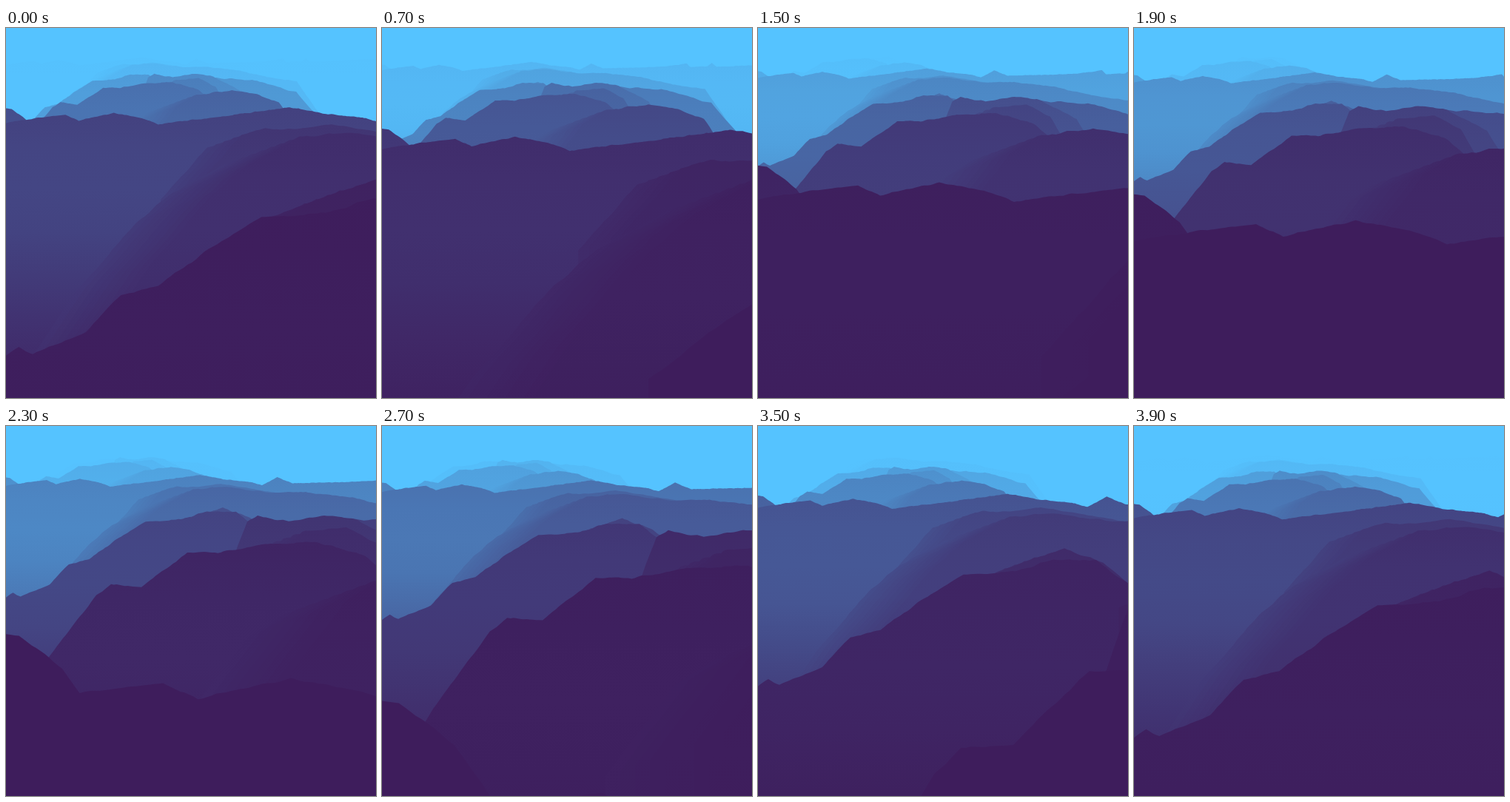
An HTML page with a canvas that plays this animation: 500x500 px, repeating every 4 s.

```html
<!DOCTYPE html>
<html>
<head>
<meta charset="utf-8">
<title>Flight over misty ridges</title>
<style>
html, body { margin: 0; width: 100%; height: 100%; overflow: hidden; background: #55c3ff; }
canvas { display: block; width: 100vw; height: 100vh; }
</style>
</head>
<body>
<canvas id="stage" width="500" height="500"></canvas>
<script>
const ctx = document.getElementById('stage').getContext('2d');
const LOOP = 4;              // seconds per cycle; the eye moves one unit per second
const HORIZON = -23;         // y of the vanishing point, whose x is 0
const NEAR = 0.45, FAR = 8.2;
const SKY = [85, 195, 255], DARK = [62, 29, 92];

const clamp = v => Math.min(1, Math.max(0, v));
const mix = (a, b, k) => a + (b - a) * k;

// Colour of the ground seen through the haze at distance d
function haze(d) {
  const u = clamp((d - 1.85) / 6.25);
  const k = u * u * (3 - 2 * u);
  return `rgb(${DARK.map((c, i) => Math.round(mix(c, SKY[i], k)))})`;
}

// Change of distance down a slope, u from crest to foot
const slope = u => 0.18 * Math.sin(Math.PI * clamp(u / 0.45)) - 1.3 * clamp((u - 0.43) / 0.57);

// Seeded value noise in -1..1, two octaves
function hash(n) {
  const v = Math.sin(n * 127.1) * 43758.5453;
  return 2 * (v - Math.floor(v)) - 1;
}
function noise(x) {
  const i = Math.floor(x);
  return mix(hash(i), hash(i + 1), x - i);
}
const rough = x => 1.1 * noise(x / 11) + 0.5 * noise(x / 4);

// pass: time the crest passes the eye; dist: distance at which the keys x,y hold
// soft: number of hazy slices behind the crest; lean: how much nearer the left end is
function ridge(pass, dist, keys, { soft = 0, lean = 0 } = {}) {
  const pts = [];
  for (let i = 0; i < keys.length - 2; i += 2) {
    const [x0, y0, x1, y1] = keys.slice(i, i + 4);
    const n = Math.ceil((x1 - x0) / 4);
    for (let k = 0; k <= n; k++) {
      const x = mix(x0, x1, k / n);
      const off = -lean * clamp(1 - x / 240);
      const y = mix(y0, y1, k / n) + rough(x + pass * 100);
      pts.push({ off, x: x * (dist + off), h: (y - HORIZON) * (dist + off) });
    }
  }
  return { pass, pts, soft };
}

const ridges = [
  // long range across the whole view
  ridge(3.7, 2.2, [0, 232, 85, 218, 135, 213, 165, 226, 245, 209, 305, 219, 346, 234,
    455, 221, 586, 204, 645, 196, 720, 210, 810, 219, 850, 230, 900, 203, 950, 224,
    1200, 217, 1310, 203, 1325, 218, 1400, 215, 1418, 200, 1440, 217, 1700, 205, 1950, 208]),
  // left shoulder
  ridge(4.05, 2.55, [0, 187, 12, 187, 52, 217, 130, 330]),
  // domes
  ridge(4.6, 3.9, [225, 190, 270, 130, 300, 112, 360, 103, 400, 109, 435, 123, 480, 190],
    { soft: 8 }),
  ridge(4.95, 2.65, [0, 400, 42, 336, 65, 303, 85, 277, 122, 229, 142, 214, 183, 217,
    245, 171, 290, 171, 350, 159, 420, 157, 485, 175, 660, 330], { lean: 0.4 }),
  ridge(5.3, 3, [350, 185, 400, 143, 460, 137, 500, 158, 560, 260], { soft: 4 }),
  ridge(5.6, 3.3, [290, 230, 313, 161, 326, 129, 340, 122, 382, 129, 430, 121, 468, 125,
    500, 141, 535, 158, 560, 200]),
  ridge(5.9, 5.2, [225, 100, 300, 78, 385, 84, 445, 102, 500, 165]),
  // diagonal spurs
  ridge(6.05, 2.95, [0, 300, 12, 293, 25, 299, 75, 278, 108, 243, 143, 235, 202, 193,
    240, 170, 300, 167, 345, 153, 395, 154, 450, 195]),
  ridge(6.4, 3.3, [220, 220, 285, 172, 320, 157, 364, 143, 410, 160, 440, 185], { soft: 3 }),
  // misty slopes
  ridge(7, 3.9, [90, 330, 150, 240, 215, 167, 250, 138, 305, 108, 355, 104, 430, 113,
    480, 112, 564, 121, 635, 138, 705, 148, 770, 240], { soft: 8 }),
  ridge(7.3, 3.3, [255, 215, 318, 145, 350, 136, 385, 137, 440, 130, 500, 140, 650, 165,
    700, 260], { soft: 4 })
];

function drawSlice({ pts }, d, k) {
  const paint = ctx.createLinearGradient(0, HORIZON + 450 / d, 0, HORIZON + 2200 / d);
  for (let u = 0; u <= 1; u += 0.125) paint.addColorStop(u, haze(d + slope(u) + k * 0.045));
  ctx.fillStyle = paint;
  const place = p => [(p.x - k * 38) / (d + p.off), HORIZON + (p.h + k * 14) / (d + p.off)];
  ctx.beginPath();
  ctx.moveTo(place(pts[0])[0], 510);
  for (const p of pts) ctx.lineTo(...place(p));
  ctx.lineTo(place(pts[pts.length - 1])[0], 510);
  ctx.fill();
}

function draw(t) {
  ctx.fillStyle = `rgb(${SKY})`;
  ctx.fillRect(0, 0, 500, 500);
  const seen = [];
  for (const r of ridges)
    for (let d = (r.pass - t + LOOP) % LOOP; d < FAR; d += LOOP)
      if (d > NEAR) seen.push({ r, d });
  seen.sort((a, b) => b.d - a.d);
  for (const { r, d } of seen)
    for (let k = r.soft; k >= 0; k--) drawSlice(r, d, k);
}

const start = performance.now();
function tick() {
  const ms = (performance.now() - start) % (LOOP * 1000);
  draw(Math.floor(ms / 100) / 10);
  requestAnimationFrame(tick);
}
tick();
</script>
</body>
</html>
```
